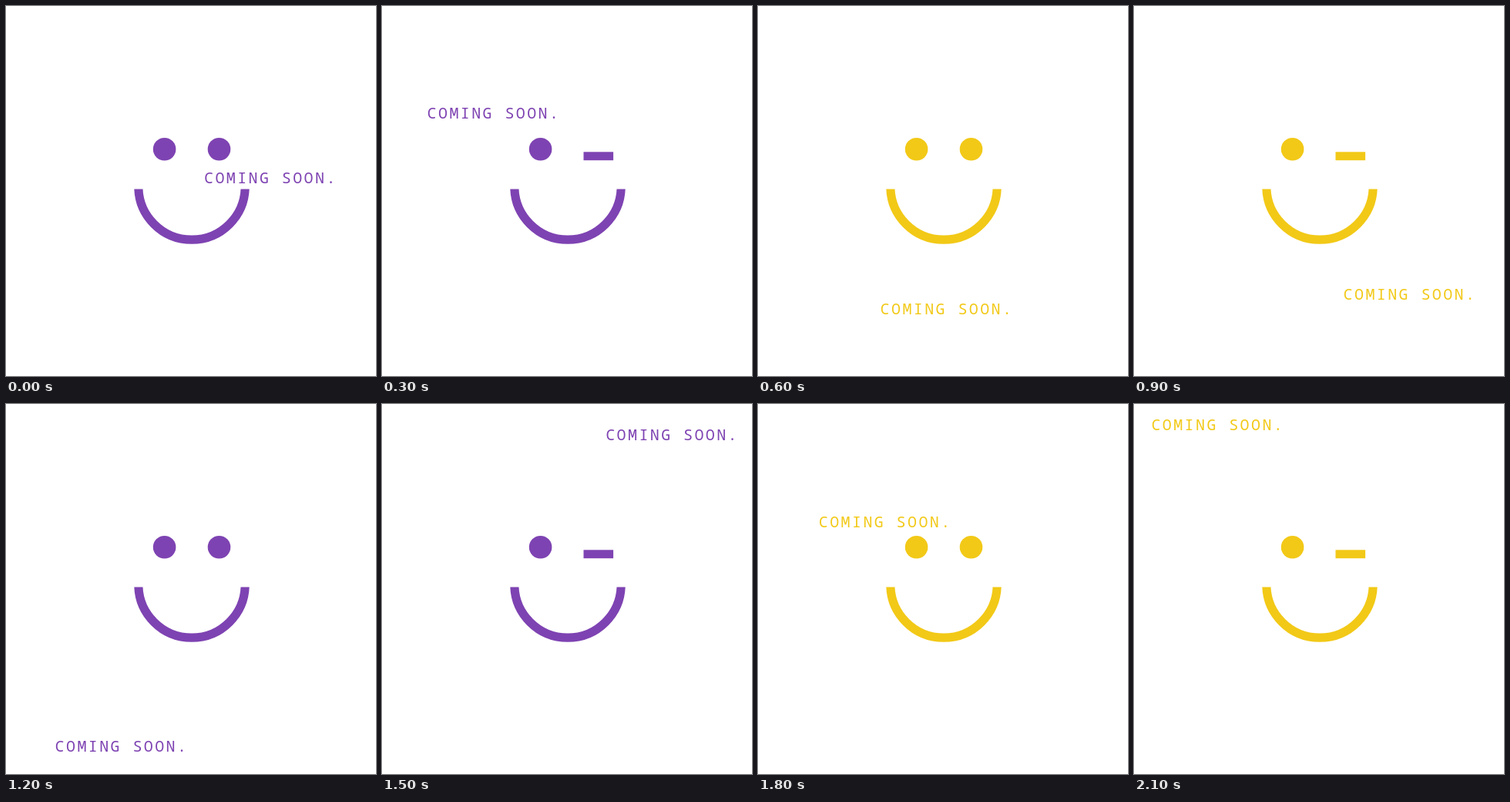
An HTML page for the animation above (2400 ms loop, 480 by 480 pixels).

```html
<!DOCTYPE html>
<html lang="en">
<head>
<meta charset="utf-8">
<title>Coming soon</title>
<style>
  html, body { margin: 0; width: 100%; height: 100%; overflow: hidden; background: #fff; }
  svg { display: block; width: 100vw; height: 100vh; }
  .scene { color: #7e43b2; animation: tint 1.2s step-end infinite; }
  .open { animation: blink .6s step-end infinite; }
  .wink { animation: blink .6s -.3s step-end infinite; }
  .note {
    font: 300 20px "Noto Sans Mono", "DejaVu Sans Mono", monospace;
    letter-spacing: 2.4px;
    animation: hop 2.4s step-end infinite;
  }
  @keyframes tint {
    0% { color: #7e43b2; }
    50%, 100% { color: #f2c917; }
  }
  @keyframes blink {
    0% { visibility: visible; }
    50%, 100% { visibility: hidden; }
  }
  /* left edge and baseline of the text */
  @keyframes hop {
    0% { transform: translate(257px, 229.5px); }
    12.5% { transform: translate(58.6px, 145.5px); }
    25% { transform: translate(158.6px, 399.5px); }
    37.5% { transform: translate(271.6px, 380.7px); }
    50% { transform: translate(63.6px, 450.5px); }
    62.5% { transform: translate(290.2px, 46.5px); }
    75%, 100% { transform: translate(78.8px, 159.5px); }
    87.5% { transform: translate(22.4px, 33.5px); }
  }
</style>
</head>
<body>
<svg viewBox="0 0 480 480">
  <clipPath id="lower"><rect y="237.5" width="480" height="100"/></clipPath>
  <g class="scene" fill="currentColor">
    <circle cx="205.6" cy="185.7" r="14.8"/>
    <circle class="open" cx="276.5" cy="185.7" r="14.8"/>
    <rect class="wink" x="261.5" y="189.3" width="38.6" height="10.9"/>
    <circle cx="241" cy="234" r="69.2" fill="none" stroke="currentColor" stroke-width="11.2" clip-path="url(#lower)"/>
    <text class="note">COMING SOON.</text>
  </g>
</svg>
</body>
</html>
```
